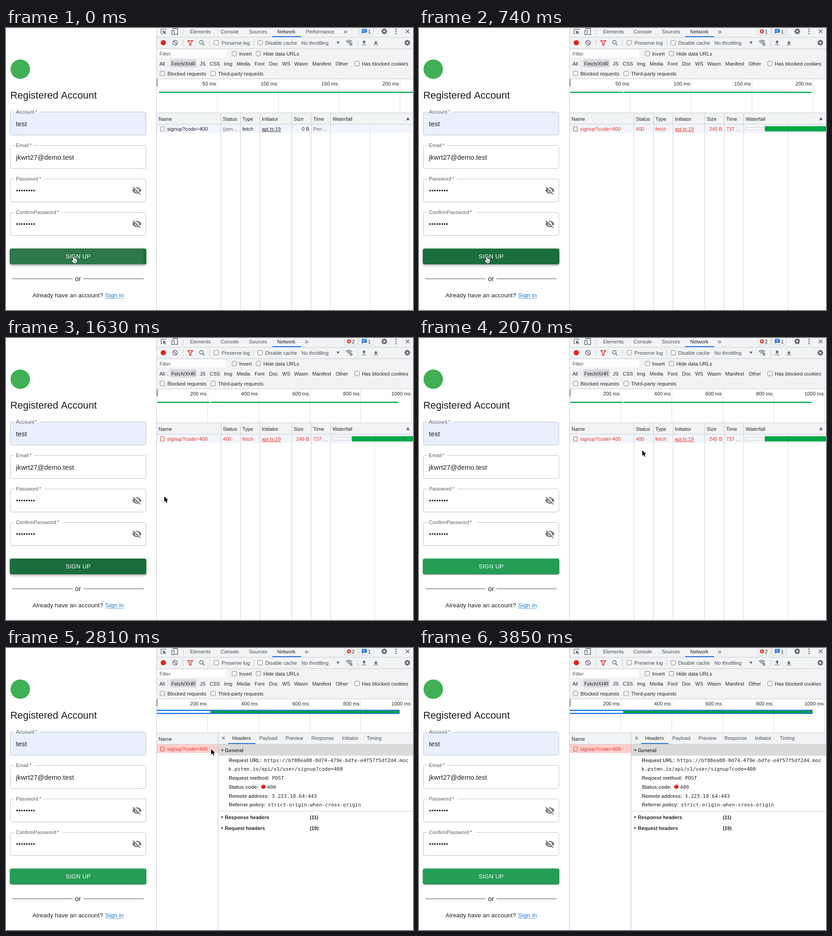
Recreate the animation shown at these times as an HTML page with a canvas. Size 899x623 px, loop 5.5 s.

```html
<!DOCTYPE html>
<html lang="en">
<head>
<meta charset="utf-8">
<title>Sign up and network panel</title>
<style>
html, body { margin: 0; width: 100%; height: 100%; overflow: hidden; background: #fff; }
canvas { display: block; }
</style>
</head>
<body>
<canvas id="stage" width="899" height="623"></canvas>
<script>
const ctx = document.getElementById('stage').getContext('2d');
const LOOP = 5500;
const SANS = '"Liberation Sans", Arial, sans-serif';
const MONO = '"DejaVu Sans Mono", monospace';
const INK = '#26272a', SOFT = '#4b4e53', GREY = '#5f6368', BAR = '#f1f3f4', LINE = '#cacdd1';
const RED = '#f0321f', GREEN = '#00a846', BLUE = '#1a73e8';

// time, left and top of the pointer
const PATH = [
  [1630, 347.5, 349], [1780, 496, 284], [1930, 506, 263], [2070, 491, 247],
  [2220, 464, 229], [2360, 457, 225], [2510, 455, 224], [2660, 451, 222],
  [3260, 490.5, 242], [3410, 734, 431], [3560, 757, 462], [3700, 763, 466]
];

function text(s, x, y, { size = 11.1, color = INK, align = 'left', weight = '', font = SANS, gap = 0 } = {}) {
  ctx.font = `${weight} ${size}px ${font}`;
  ctx.letterSpacing = gap + 'px';
  ctx.textAlign = align;
  ctx.fillStyle = color;
  ctx.fillText(s, x, y);
  const w = ctx.measureText(s).width;
  ctx.letterSpacing = '0px';
  return w;
}

function rect(x, y, w, h, color) {
  ctx.fillStyle = color;
  ctx.fillRect(x, y, w, h);
}

const vline = (x, y, h, color = LINE) => rect(x, y, 1, h, color);
const hline = (x, y, w, color = LINE) => rect(x, y, w, 1, color);

function box(x, y, w, h, r, fill, stroke, width = 1) {
  ctx.beginPath();
  ctx.roundRect(x, y, w, h, r);
  if (fill) { ctx.fillStyle = fill; ctx.fill(); }
  if (stroke) { ctx.strokeStyle = stroke; ctx.lineWidth = width; ctx.stroke(); }
}

function dot(x, y, r, color) {
  ctx.beginPath();
  ctx.arc(x, y, r, 0, Math.PI * 2);
  ctx.fillStyle = color;
  ctx.fill();
}

function ring(x, y, r, color, width = 1.3, from = 0, to = Math.PI * 2) {
  ctx.beginPath();
  ctx.arc(x, y, r, from, to);
  ctx.strokeStyle = color;
  ctx.lineWidth = width;
  ctx.stroke();
}

function trace(points, close) {
  ctx.beginPath();
  points.forEach(([x, y], i) => i ? ctx.lineTo(x, y) : ctx.moveTo(x, y));
  if (close) ctx.closePath();
}

function stroke(points, color = GREY, width = 1.3, close = false) {
  trace(points, close);
  ctx.strokeStyle = color;
  ctx.lineWidth = width;
  ctx.stroke();
}

function fill(points, color = GREY) {
  trace(points, true);
  ctx.fillStyle = color;
  ctx.fill();
}

function at(x, y, draw) {
  ctx.save();
  ctx.translate(x, y);
  draw();
  ctx.restore();
}

// ---------- form ----------

function eye(x, y) {
  at(x, y, () => {
    const c = '#757575';
    ctx.beginPath();
    ctx.moveTo(-10.1, 0);
    ctx.quadraticCurveTo(-6.5, -6.9, 0, -6.9);
    ctx.quadraticCurveTo(6.5, -6.9, 10.1, 0);
    ctx.quadraticCurveTo(6.5, 6.9, 0, 6.9);
    ctx.quadraticCurveTo(-6.5, 6.9, -10.1, 0);
    ctx.fillStyle = c;
    ctx.fill();
    dot(0, 0, 4.6, '#fff');
    dot(0, 0, 2.8, c);
    stroke([[-7.2, -9.2], [9.2, 7.2]], '#fff', 2);
    stroke([[-8.6, -7.7], [7.7, 8.6]], c, 1.8);
  });
}

function field(y, label, notch, value, filled) {
  box(9.5, y + .5, 299.5, 51, 3.7, filled ? '#e8f0fe' : '#fff', '#c0c0c0');
  rect(18, y - 1, notch - 18, 2, '#fff');
  const w = text(label, 22, y + 4, { size: 11.05, color: '#5c5c5c', gap: .1 });
  text('*', 22 + w + 2, y + 4, { size: 11.05, color: '#5c5c5c' });
  if (value) return text(value, 22, y + 31.5, { size: 14.7, color: '#1c1c1c', gap: .14 });
  for (let i = 0; i < 8; i++) dot(24.6 + i * 5.33, y + 26, 1.85, '#1c1c1c');
  eye(289, y + 26);
}

function buttonShape(color, spread = 0) {
  box(8.6 - spread, 487.5 - spread, 301.2 + spread * 2, 34.5 + spread * 2, 3.7, color);
}

function shadow(color, y, blur, spread, alpha) {
  ctx.save();
  ctx.shadowColor = `rgba(0,0,0,${alpha})`;
  ctx.shadowBlur = blur;
  ctx.shadowOffsetY = y;
  buttonShape(color, spread);
  ctx.restore();
}

function button(t) {
  const hover = t < 1780;
  const color = hover ? '#1a6e3c' : '#249d55';
  if (hover) {
    shadow(color, 1.8, 3.7, -.9, .2);
    shadow(color, 3.7, 4.6, 0, .14);
    shadow(color, .9, 9.2, 0, .12);
  } else {
    shadow(color, 2.8, .9, -1.8, .2);
    shadow(color, 1.8, 1.8, 0, .14);
    shadow(color, .9, 4.6, 0, .12);
  }
  if (t < 150) {
    ctx.save();
    buttonShape(color);
    ctx.clip();
    dot(150, 511, 154, '#2d784a');
    ctx.restore();
  }
  text('SIGN UP', 159.5, 509.2, { size: 12.9, color: '#fff', align: 'center', gap: .37 });
}

function form(t) {
  rect(0, 0, 333, 623, '#fff');
  dot(31.5, 91, 21.5, '#3fb055');
  text('Registered Account', 9.5, 156, { size: 21.9, color: '#1c1c1c' });
  field(185, 'Account', 75, 'test', true);
  field(259, 'Email', 62, 'jkwrt27@demo.test');
  field(333, 'Password', 84);
  field(407, 'ConfirmPassword', 125);
  button(t);
  hline(14, 553.5, 133, '#444');
  hline(171, 553.5, 133, '#444');
  text('or', 159.2, 559, { size: 14.7, color: '#1c1c1c', align: 'center', gap: .14 });
  text('Already have an account?', 58.5, 595, { size: 13.2, color: '#1c1c1c', gap: .14 });
  text('Sign in', 219, 595, { size: 13.2, color: '#1976d2', gap: .14 });
  hline(219, 597, 41, '#6aa5e0');
}

// ---------- panel icons ----------

function gear(x, y) {
  at(x, y, () => {
    for (let i = 0; i < 8; i++) {
      ctx.rotate(Math.PI / 4);
      rect(-1.4, -6.3, 2.8, 3, GREY);
    }
    ring(0, 0, 3.6, GREY, 2.6);
  });
}

function cross(x, y, r, color = GREY, w = 1.4) {
  stroke([[x - r, y - r], [x + r, y + r]], color, w);
  stroke([[x + r, y - r], [x - r, y + r]], color, w);
}

function check(x, y, label, lx, color = INK) {
  box(x + .5, y + .5, 10, 10, 2, '#fff', '#767676');
  text(label, lx, y + 9.5, { size: 11.2, color });
}

function arrowLine(x, y, dir) {
  at(x, y, () => {
    hline(-5, 4, 10, GREY);
    rect(-1.3, -4, 2.6, 6, GREY);
    const tip = dir < 0 ? -6 : 3.5, base = dir < 0 ? -1.5 : -1;
    fill([[-4.2, base], [0, tip], [4.2, base]]);
  });
}

function tabBar(t) {
  rect(333, 0, 566, 20, BAR);
  hline(333, 20, 566);
  stroke([[352.5, 5], [352.5, 2.5], [342.5, 2.5], [342.5, 12.5], [346, 12.5]], GREY, 1.2);
  fill([[346, 5.5], [354, 9], [350.8, 10], [353.5, 13], [352.4, 14], [349.7, 11.2], [348.4, 14]]);
  stroke([[369, 3], [369, 1.2], [379, 1.2], [379, 14.3], [373, 14.3]], GREY, 1.4);
  box(366, 5.5, 5.5, 9, 1, BAR, GREY, 1.3);
  vline(391, 2, 14);

  const tab = (s, x, color = SOFT) => text(s, x, 12, { size: 11, color });
  tab('Elements', 406.5);
  tab('Console', 474);
  tab('Sources', 536.5);
  tab('Network', 599, INK);
  rect(588, 18, 64, 2, BLUE);
  const early = t < 740;
  if (early) tab('Performance', 662.5);
  text('»', early ? 745.5 : 659.5, 12.5, { size: 16, color: GREY });

  if (!early) {
    box(747.5, -3, 29, 18.5, 2, null, LINE);
    dot(757.5, 7.5, 4.6, '#d93025');
    cross(757.5, 7.5, 1.8, '#fff', 1.2);
    text(t < 880 ? '1' : '2', 764, 11.5, { size: 11 });
  }
  box(779.5, -3, 32, 18.5, 2, null, LINE);
  box(786, 2, 11, 8.5, 1.2, BLUE);
  fill([[786, 9], [786, 13], [789.5, 10]], BLUE);
  hline(788, 4, 7, '#fff');
  hline(788, 7, 5, '#fff');
  text('1', 799.5, 11.5, { size: 11 });
  gear(835.5, 7.5);
  for (const y of [3, 7.7, 12.4]) dot(861.5, y, 1.4, GREY);
  cross(887, 7.5, 4, GREY, 1.6);
}

function toolBar() {
  rect(333, 21, 566, 91, BAR);
  hline(333, 45, 566);
  dot(347.5, 32.5, 5.8, '#e5231b');
  ring(373.5, 32.5, 5.2, GREY, 1.4);
  stroke([[370, 29], [377, 36]], GREY, 1.4);
  vline(391, 25, 15);
  stroke([[401.5, 28], [412.5, 28], [408.5, 33], [408.5, 38], [405.5, 38], [405.5, 33]], '#e5231b', 1.5, true);
  ring(431.5, 31.5, 4, GREY, 1.4);
  stroke([[434.5, 34.5], [438.5, 38.5]], GREY, 1.6);
  vline(449, 25, 15);
  check(459, 27, 'Preserve log', 476, SOFT);
  vline(547, 25, 15);
  check(556, 27, 'Disable cache', 572.5, SOFT);
  text('No throttling', 652.5, 36.5, { color: SOFT });
  fill([[730, 30], [736.6, 30], [733.3, 35.5]]);
  for (const r of [3.5, 6.5, 9.5]) ring(757.5, 36.5, r, GREY, 1.4, -2.4, -.75);
  ring(762, 36, 2.2, GREY, 1.5);
  vline(777, 25, 15);
  arrowLine(791, 33, -1);
  arrowLine(817, 33, 1);
  gear(886.5, 32.5);

  rect(334, 48, 152, 17, '#fff');
  text('Filter', 339, 61, { color: '#555' });
  check(499, 51, 'Invert', 515);
  check(552, 51, 'Hide data URLs', 568.5);

  box(362, 69, 59, 18, 4, '#d8dade');
  vline(357, 71, 14);
  const types = { All: 339, 'Fetch/XHR': 365, JS: 428, CSS: 450, Img: 481.5, Media: 509.5, Font: 549,
    Doc: 581, WS: 610, Wasm: 636.5, Manifest: 676.5, Other: 728 };
  for (const s in types) text(s, types[s], 82.5, { size: 11, color: INK });
  check(770, 73, 'Has blocked cookies', 786);
  check(340, 95, 'Blocked requests', 356.5);
  check(452, 95, 'Third-party requests', 468.5);
}

function timeline(t) {
  rect(333, 112, 566, 76, '#fff');
  hline(333, 112, 566);
  const fine = t < 880;
  const first = fine ? 466 : 445, step = fine ? 134.6 : 112.8;
  for (let i = 0; i < (fine ? 4 : 5); i++) {
    const x = Math.round(first + i * step);
    vline(x, 113, 74, '#dcdcdc');
    text(`${(i + 1) * (fine ? 50 : 200)} ms`, x - 2, 127, { align: 'right' });
  }
  rect(333, 113, 1.5, 16, '#6b6b6b');
  const band = (x, w, color) => rect(x, 140.8, w, 2.6, color);
  if (t < 740) {
    band(338, 559, GREEN);
    band(897, 2, '#2f9bd6');
  } else if (t < 2810) {
    band(334, 116.5, GREEN);
    band(452, 415, GREEN);
  } else {
    rect(333, 136.5, 536.5, 9.2, BLUE);
    rect(333, 139.2, 118.5, 4, '#fff');
    rect(451.5, 138.4, 416, 5.6, '#0b9d50');
  }
  hline(333, 187, 566);
}

function nameCell(color) {
  box(341.5, 218, 8, 10, 1, null, color === INK ? '#8a8a8a' : color);
  text('signup?code=400', 356, 227, { size: 11.3, color });
}

function table(t) {
  const waiting = t < 740;
  const color = waiting ? INK : RED, dim = waiting ? '#666' : RED;
  rect(333, 188, 566, 24, BAR);
  rect(333, 213, 566, 19, '#f2f5fc');
  hline(333, 212, 566);
  const heads = { Name: 337, Status: 479, Type: 522, Initiator: 565, Size: 635.5, Time: 678.5, Waterfall: 721.5 };
  for (const s in heads) text(s, heads[s], 204.5);
  for (const x of [475, 518, 561, 631, 674, 717]) vline(x - .5, 188, 435, '#c9ccd0');
  fill([[884, 203.5], [891.5, 203.5], [887.8, 196.5]]);

  nameCell(color);
  text(waiting ? '(pen…' : '400', 479, 227, { color: dim });
  text('fetch', 522, 227, { color });
  text('api.ts:19', 565, 227, { color });
  hline(565, 228.5, 42, color);
  text(waiting ? '0 B' : '245 B', 670, 227, { color, align: 'right' });
  text(waiting ? 'Pen…' : '737 …', 678.5, 227, { color: dim });
  if (waiting) {
    vline(804, 213, 410, '#e2e2e2');
    vline(891, 213, 410, '#e2e2e2');
  } else {
    box(721.5, 219.5, 42, 6, 0, '#fff', '#c8c8c8');
    rect(764, 217, 135, 11.5, GREEN);
    vline(814, 213, 410, 'rgba(0,0,0,.13)');
  }
}

function details() {
  rect(333, 188, 566, 24, BAR);
  hline(333, 212, 566);
  text('Name', 337, 204.5);
  rect(333, 213, 135, 19, '#fccfce');
  nameCell(RED);
  vline(468, 188, 435, '#c0c3c7');

  cross(480.5, 199, 2.8, GREY, 1.2);
  const tabs = { Headers: 499.5, Payload: 559.5, Preview: 617.5, Response: 674.5, Initiator: 742, Timing: 797 };
  for (const s in tabs) text(s, tabs[s], 203, { size: 11, color: s === 'Headers' ? INK : SOFT });
  rect(491, 210, 60, 2, BLUE);

  rect(469, 213, 430, 25, '#dadada');
  fill([[474.5, 224], [481, 224], [477.8, 229]]);
  const bold = (s, x, y, color = SOFT) => text(s, x, y, { size: 11, color, weight: 'bold' });
  const code = (s, x, y) => text(s, x, y, { size: 11.04, font: MONO });
  bold('General', 483.5, 230, '#404040');

  bold('Request URL:', 492, 252);
  code('https://bf88ea08-0d74-479e-bdfe-e4f57f5df2d4.moc', 570, 252);
  code('k.pstmn.io/api/v1/user/signup?code=400', 491.5, 271);
  bold('Request method:', 492, 291);
  code('POST', 587.5, 291);
  bold('Status code:', 492, 311);
  const shine = ctx.createLinearGradient(0, 301, 0, 311);
  shine.addColorStop(0, '#f58a80');
  shine.addColorStop(.45, '#e51c12');
  shine.addColorStop(1, '#d8140c');
  dot(568.5, 306.3, 4.8, shine);
  code('400', 576.5, 311);
  bold('Remote address:', 492, 330.5);
  code('3.223.10.64:443', 587, 330.5);
  bold('Referrer policy:', 492, 350);
  code('strict-origin-when-cross-origin', 578.5, 350);
  hline(469, 360, 430);

  [['Response headers', '(11)', 377.5], ['Request headers', '(19)', 401.5]].forEach(([s, n, y]) => {
    fill([[475.5, y - 7], [475.5, y - 1], [480.5, y - 4]]);
    bold(s, 483.5, y, INK);
    bold(n, 671, y, INK);
  });
}

// ---------- pointer ----------

function hand() {
  at(144.2, 504.3, () => {
    ctx.lineJoin = 'round';
    ctx.beginPath();
    ctx.moveTo(3.2, 2.3);
    ctx.quadraticCurveTo(4.5, .2, 5.7, 2);
    ctx.lineTo(7, 5.5);
    ctx.quadraticCurveTo(8.5, 4.6, 9.2, 6);
    ctx.quadraticCurveTo(10.7, 5.3, 11.3, 6.9);
    ctx.quadraticCurveTo(12.6, 6.8, 12.7, 8.6);
    ctx.quadraticCurveTo(13, 11.5, 11.4, 15);
    ctx.lineTo(5.8, 15.5);
    ctx.lineTo(1.2, 10.4);
    ctx.quadraticCurveTo(.8, 8.3, 3, 8.9);
    ctx.lineTo(4.8, 10);
    ctx.closePath();
    ctx.strokeStyle = '#111';
    ctx.lineWidth = 1.6;
    ctx.stroke();
    ctx.fillStyle = '#fff';
    ctx.fill();
    for (const x of [6.5, 8.3, 10.1]) stroke([[x, 10], [x + .1, 13.3]], '#111', .7);
  });
}

function arrow(x, y) {
  at(x, y, () => {
    const shape = [[2.1, 1.2], [2.1, 13.2], [4.9, 10.6], [6.8, 15.2], [8.9, 14.3], [7, 9.8], [10.7, 9.6]];
    ctx.lineJoin = 'round';
    stroke(shape, '#fff', 2, true);
    fill(shape, '#000');
  });
}

function pointer(t) {
  if (t < PATH[0][0]) return hand();
  if (t >= 3850) return;
  const [, x, y] = PATH.findLast(p => p[0] <= t);
  arrow(x, y);
}

function draw(now) {
  const t = now % LOOP;
  ctx.lineJoin = 'miter';
  form(t);
  rect(333, 188, 566, 435, '#fff');
  tabBar(t);
  toolBar();
  timeline(t);
  if (t < 2810) table(t);
  else details();
  vline(332, 0, 623, '#c4c7ca');
  pointer(t);
}

let start;
function tick(now) {
  start ??= now;
  draw(now - start);
  requestAnimationFrame(tick);
}
requestAnimationFrame(tick);
</script>
</body>
</html>
```
